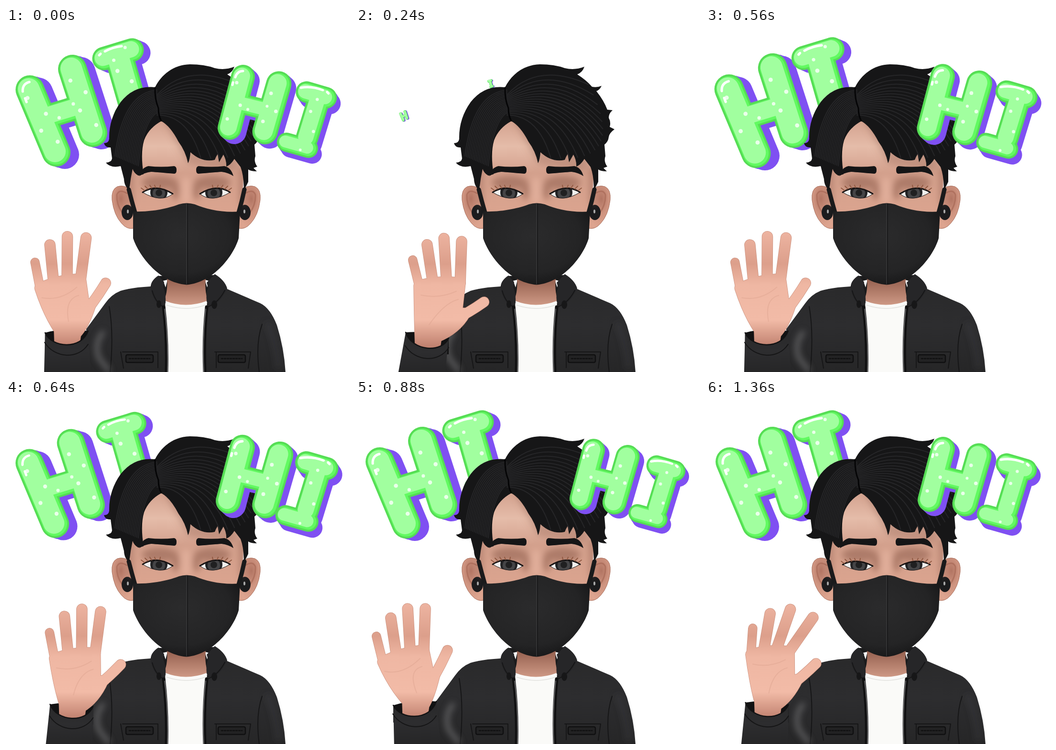
An HTML page for the animation above (1.44 s loop, 720 px wide and 720 px high).

```html
<!DOCTYPE html>
<html lang="en">
<head>
<meta charset="utf-8">
<title>Hi</title>
<style>
html, body { margin: 0; width: 100%; height: 100%; overflow: hidden; background: #fff; }
svg { display: block; width: 100vw; height: 100vh; }
path { stroke-linecap: round; stroke-linejoin: round; }
.line { fill: none; }
</style>
</head>
<body>
<svg viewBox="0 0 720 720">
  <defs>
    <filter id="soft" x="-60%" y="-60%" width="220%" height="220%"><feGaussianBlur stdDeviation="7"/></filter>
    <linearGradient id="skin" gradientUnits="userSpaceOnUse" x1="0" y1="200" x2="0" y2="390">
      <stop offset="0" stop-color="#d5a592"/><stop offset=".25" stop-color="#e5bca9"/>
      <stop offset=".55" stop-color="#d3a08c"/><stop offset="1" stop-color="#dba48f"/>
    </linearGradient>
    <linearGradient id="handSkin" gradientUnits="userSpaceOnUse" x1="0" y1="420" x2="0" y2="665">
      <stop offset="0" stop-color="#efb6a3"/><stop offset=".3" stop-color="#dc9f8b"/>
      <stop offset=".48" stop-color="#efb7a3"/><stop offset=".78" stop-color="#f2bba7"/>
      <stop offset="1" stop-color="#c18270"/>
    </linearGradient>
    <linearGradient id="neck" x2="0" y2="1">
      <stop offset="0" stop-color="#95604f"/><stop offset="1" stop-color="#d09b87"/>
    </linearGradient>
    <radialGradient id="mask" cx=".45" cy=".4" r=".65">
      <stop offset="0" stop-color="#2b2b2c"/><stop offset=".7" stop-color="#242425"/><stop offset="1" stop-color="#161617"/>
    </radialGradient>
    <radialGradient id="ear" cx=".4" cy=".3" r=".7">
      <stop offset="0" stop-color="#b27563"/><stop offset=".5" stop-color="#cf9480"/><stop offset="1" stop-color="#dda48f"/>
    </radialGradient>
    <linearGradient id="cloth" x2="0" y2="1">
      <stop offset="0" stop-color="#29292a"/><stop offset=".5" stop-color="#2d2d2f"/><stop offset="1" stop-color="#262627"/>
    </linearGradient>
    <clipPath id="eyeClip"><path id="eyeShape"/></clipPath>
  </defs>

  <g id="backLetters"></g>

  <!-- torso -->
  <path fill="url(#cloth)" d="M318 530L302 541Q264 543 240 550Q220 558 207 577L168 630V720H585Q582 670 567 622Q553 586 532 576L460 545L438 525Z"/>
  <path fill="#1b1b1c" d="M318 519L440 517L436 580H320Z"/>
  <path fill="#fff" d="M329 529L338 527L334 543ZM416 527L424 529L421 543Z"/>
  <path fill="url(#neck)" d="M337 525H418Q415 556 425 574Q380 590 329 573Q339 556 337 525Z"/>
  <path fill="#fafaf8" d="M333 571Q376 588 421 571L413 720H338Z"/>
  <path class="line" stroke="#e2e2df" stroke-width="1.5" d="M336 580Q378 594 417 580"/>
  <path fill="#262628" d="M319 518Q301 530 303 545Q306 566 319 578Q330 589 334 575Q335 558 329 541L331 532Z"/>
  <path fill="#262628" d="M437 515Q458 528 463 545Q452 568 438 578Q424 586 420 572Q418 556 423 543L420 533Z"/>
  <g class="line" stroke="#161617" stroke-width="2">
    <path d="M306 550Q313 575 331 585M458 549Q445 574 424 583M218 720Q226 640 216 583M530 720Q522 660 536 620"/>
    <path d="M244 678H318V711M240 678L246 712M437 678H512L507 712M440 678V711"/>
  </g>
  <g fill="#222223" stroke="#101011" stroke-width="2.5">
    <rect x="251" y="684" width="57" height="16" rx="3"/><rect x="444" y="684" width="57" height="16" rx="3"/>
    <path class="line" d="M258 692H301M451 692H494" stroke-dasharray="3 3"/>
  </g>
  <path class="line" stroke="#101011" stroke-width="7" d="M330 584Q338 650 336 720M420 584Q413 650 416 720"/>
  <path class="line" stroke="#777779" stroke-width="1.6" d="M332 588Q340 650 338 720M418 588Q411 650 414 720"/>
  <g fill="#171718"><ellipse cx="320" cy="578" rx="5" ry="8"/><ellipse cx="436" cy="579" rx="6" ry="9"/></g>
  <g filter="url(#soft)">
    <path class="line" stroke="#8a8a8c" stroke-width="9" opacity=".6" d="M202 638Q184 660 194 690L214 716"/>
    <path class="line" stroke="#444446" stroke-width="8" opacity=".5" d="M548 620Q566 660 570 710"/>
  </g>

  <!-- head -->
  <g id="earSide">
    <path fill="url(#ear)" stroke="#a96f5d" d="M262 340Q248 327 233 332Q220 338 222 360Q226 392 242 409Q254 423 268 419Z"/>
    <path class="line" stroke="#a86a58" stroke-width="3" opacity=".7" d="M253 346Q237 336 232 349Q231 369 243 386"/>
    <ellipse cx="254" cy="386" rx="12" ry="16" fill="#1b1b1d"/>
    <ellipse cx="255" cy="384" rx="2" ry="4" fill="#aaa"/>
  </g>
  <use href="#earSide" transform="matrix(-1 0 0 1 754 0)"/>
  <path fill="url(#skin)" d="M256 290Q258 345 270 390H488Q497 345 498 290L470 210L330 180L270 220Z"/>
  <g filter="url(#soft)">
    <g fill="#8d5c4b" opacity=".55">
      <ellipse cx="322" cy="324" rx="38" ry="15"/><ellipse cx="432" cy="324" rx="38" ry="15"/>
      <rect x="256" y="290" width="9" height="80"/><rect x="489" y="290" width="9" height="80"/>
      <ellipse cx="355" cy="340" rx="8" ry="20"/><ellipse cx="399" cy="340" rx="8" ry="20"/>
      <path d="M330 195L382 285L480 300L490 270L350 190Z" opacity=".6"/>
    </g>
    <path class="line" stroke="#eab9a5" stroke-width="12" d="M377 320V362" opacity=".7"/>
  </g>
  <g id="eyeSide">
    <g clip-path="url(#eyeClip)">
      <rect x="280" y="325" width="75" height="40" fill="#f0efed"/>
      <circle cx="320" cy="344" r="18" fill="#222224"/><circle cx="320" cy="346" r="13" fill="#454547"/>
      <circle cx="320" cy="345" r="7" fill="#202021"/>
    </g>
    <path id="eyeLine" class="line" stroke="#171313"/>
    <path id="lidLine" class="line" stroke="#171313"/>
    <path id="lashes" class="line" stroke="#925a43" stroke-width="2" d="M290 340L283 335M297 337L291 331M305 335L301 329M313 334L311 329M322 334L323 329"/>
    <path id="brow" fill="#151516" d="M279 310Q284 292 298 289Q325 292 352 289Q357 290 357 297Q357 305 352 305Q318 302 304 301Q289 303 279 310Z"/>
  </g>
  <use href="#eyeSide" transform="matrix(-1 0 0 1 755 0)"/>
  <path class="line" stroke="#1a1a1b" stroke-width="9" d="M257 338Q263 362 270 386M499 338Q494 362 487 386"/>
  <path fill="url(#mask)" d="M266 384C305 386 345 376 362 369Q378 364 395 369C420 380 455 387 490 384L487 440C477 476 434 533 378 537.500C320 533 278 476 266 440Z"/>
  <path class="line" stroke="#38383a" stroke-width="1.5" d="M378 368V536"/>
  <path class="line" stroke="#151516" stroke-width="1.5" d="M380 368V536"/>
  <path fill="#161617" d="M255 337Q247 328 247 316L240 289Q220 294 209 282Q221 281 222 273L219 250Q208 251 205 241Q215 241 216 232Q215 190 240 155Q268 119 312 124C325 98 350 77 385 76Q415 76 437 84Q458 89 478 81Q474 93 463 97Q482 109 494 123Q505 125 514 121Q510 130 503 132Q519 152 526 171L537 172Q529 179 529 188Q534 197 531 207L541 212Q530 220 529 228Q528 238 520 244L522 268Q518 280 526 290L518 293L525 300Q512 300 507 296L507 322L498 340Q498 310 491 291L478 274Q470 287 461 290Q462 278 455 265L446 281L443 264Q439 270 437 276Q410 282 386 260Q385 275 381 283Q376 258 361 238Q344 205 325 195Q299 209 289 235Q281 262 288 306L277 309Q268 304 265 295Q260 318 258 340Z"/>
  <g id="strands" class="line" stroke="#262628" stroke-width="2"></g>
  <path class="line" stroke="#050506" stroke-width="3" d="M312 125Q311 148 319 168Q319 184 325 194"/>

  <g id="arm"></g>
  <g id="frontLetters"></g>
</svg>
<script>
const $ = id => document.getElementById(id);
const mix = (a, b, t) => a + (b - a) * t;
const clamp = (v, lo, hi) => Math.min(hi, Math.max(lo, v));
const quad = (a, b, c, t) => mix(mix(a, b, t), mix(b, c, t), t);
let seed = 7;
const random = () => (seed = seed * 16807 % 2147483647) / 2147483647;

// Hair strands fan out from the parting
let hair = '';
for (let t = 0; t < 1; t += 1 / 16) {
  hair += `M316 ${130 + 50 * t}Q${245 + 45 * t} ${135 + 65 * t} ${228 + 52 * t} ${268 + 22 * t}`;
  hair += `M316 ${140 + 45 * t}Q${quad(380, 500, 365, t)} ${quad(70, 120, 190, t)} ${quad(486, 580, 384, t)} ${quad(118, 300, 268, t)}`;
}
$('strands').innerHTML = `<path d="${hair}"/>`;

// Each letter is a few bars: x1, y1, x2, y2, width. Drift: shift while the letter is small.
const letters = [
  { layer: 'backLetters', start: 3, cx: 115, cy: 174, drift: [-15, 10], shadow: [18, 5],
    bars: [[50, 129, 105, 260, 60], [139, 86, 182, 219, 60], [85, 186, 160, 163, 50]],
    shine: 'M35 133Q34 117 49 113M40 147L43 155' },
  { layer: 'backLetters', start: 3, cx: 243, cy: 110, drift: [38, 6], shadow: [14, 6],
    bars: [[205, 64, 264, 46, 49], [238, 65, 267, 166, 60], [250, 184, 296, 168, 48]],
    shine: 'M207 49Q223 40 242 38M195 57L198 54' },
  { layer: 'frontLetters', start: 5, cx: 522, cy: 163, drift: [0, 0], shadow: [10, 9],
    bars: [[496, 102, 468, 209, 50], [571, 117, 542, 217, 53], [490, 158, 555, 174, 42]],
    shine: 'M480 103Q484 90 496 90M475 114L474 119' },
  { layer: 'frontLetters', start: 5, cx: 632, cy: 198, drift: [0, 0], shadow: [8, 12],
    bars: [[629, 134, 670, 146, 45], [653, 155, 630, 230, 47], [587, 239, 633, 252, 40]],
    shine: 'M617 125Q640 121 663 130M672 134L675 137' }
];

// Dots run along a bar, alternating between its sides
function dotsOn([x1, y1, x2, y2, w]) {
  const length = Math.hypot(x2 - x1, y2 - y1), count = Math.round(length / 32);
  let dots = '';
  for (let i = 0; i < count; i++) {
    const t = (i + .4 + .3 * random()) / count, side = (i % 2 ? 1 : -1) * w * .19 / length;
    dots += `<circle cx="${mix(x1, x2, t) + (y2 - y1) * side}" cy="${mix(y1, y2, t) - (x2 - x1) * side}" r="${w / 14}" fill="#eaffea"/>`;
  }
  return dots;
}

function buildLetter(letter) {
  const { bars, shadow: [sx, sy], shine, layer } = letter;
  const coat = (dx, dy, color, thinner) => `<g stroke="${color}" transform="translate(${dx} ${dy})">` +
    bars.map(([x1, y1, x2, y2, w]) => `<path d="M${x1} ${y1}L${x2} ${y2}" stroke-width="${w - thinner}"/>`).join('') + '</g>';
  letter.node = document.createElementNS('http://www.w3.org/2000/svg', 'g');
  letter.node.innerHTML = coat(sx / 2, sy / 2, '#7f50f2', 0) + coat(sx, sy, '#7f50f2', 0) +
    coat(0, 0, '#56dc55', 0) + coat(0, 0, '#62fa61', 8) + coat(-2.5, -1.5, '#a1ff9f', 15) +
    bars.map(dotsOn).join('') + `<path class="line" stroke="#fff" stroke-width="5" d="${shine}"/>`;
  $(layer).append(letter.node);
}
letters.forEach(buildLetter);

// Grows to full size, then one sine ripple over and under it
function popScale(step) {
  const ripple = clamp((step - 1.6) / 5.8, 0, 1);
  return step < 0 ? 0 : Math.min(1, .1 + .45 * step) + .05 * Math.sin(2 * Math.PI * ripple);
}

function poseLetter({ node, start, cx, cy, drift }, frame) {
  const s = frame ? popScale(frame - start) : 1;
  const d = clamp((1 - s) * 6.5, 0, 1);
  node.setAttribute('transform', `translate(${cx + drift[0] * d} ${cy + drift[1] * d}) scale(${s}) translate(${-cx} ${-cy})`);
}

// Wave keys: frame, sway (0 outward, 1 toward the face), bend of the trailing fingers
const waveKeys = [
  [0, .2, .1], [1, 0, 0], [3, 1, 0], [5, 1, 1], [7, .2, .1], [9, 1, .1],
  [11, 0, 0], [14, 1, 0], [16, 1, 1], [17, .5, .6], [18, .2, .1]
];
function waveAt(frame) {
  const i = waveKeys.findIndex(key => key[0] > frame);
  const [from, to] = [waveKeys[i - 1], waveKeys[i]];
  const t = (frame - from[0]) / (to[0] - from[0]);
  return [mix(from[1], to[1], t), mix(from[2], to[2], t)];
}
function reach(x, y, degrees, length) {
  const angle = degrees * Math.PI / 180;
  return [x + Math.sin(angle) * length, y - Math.cos(angle) * length];
}

function drawArm(sway, bend) {
  const x = 123 + 26 * sway - 14 * bend, y = 635 + 8 * sway - 6 * bend, tilt = -4 + 10 * sway + 2 * bend;
  const px = 56 + 76 * sway, py = 548 - 9 * sway - 18 * bend;
  const ix = 142 + 76 * sway - 10 * bend, iy = 524 + 10 * sway - 4 * bend;
  const rootX = ix + 1 - 2 * tilt, rootY = iy + 76;
  const digits = [];
  for (let i = 0; i < 4; i++) {
    const t = i / 3, bx = mix(px, ix, t), by = mix(py, iy, t) - 27 * t * (1 - t);
    const [fx, fy] = reach(bx, by, -14 + 16 * t + bend * (30 + 25 * t ** 3), 55 + 90 * t - 58 * t * t);
    digits.push([`M${bx} ${by}L${fx} ${fy}`, i ? 22 : 18]);
  }
  const [tx, ty] = reach(rootX, rootY, 28 + 31 * sway + 10 * bend, 86 - 15 * sway);
  digits.push([`M${rootX} ${rootY}Q${mix(rootX, tx, .5) + 2} ${mix(rootY, ty, .5) + 2} ${tx} ${ty}`, 21]);
  const palm = `M${px} ${py}Q${mix(px, ix, .5)} ${mix(py, iy, .5) - 9} ${ix} ${iy}L${rootX + 4} ${rootY - 14}` +
    `L${mix(rootX, tx, .35)} ${mix(rootY, ty, .35)}Q${rootX + 3} ${rootY + 20} ${x + 19} ${y + 4}L${x + 16} ${y + 24}H${x - 14}` +
    `L${x - 15} ${y - 4}Q${mix(px, x - 15, .4)} ${mix(py, y, .55)} ${px} ${py}Z`;
  const hand = (color, extra) => `<g fill="none" stroke="${color}">` +
    digits.map(([d, w]) => `<path d="${d}" stroke-width="${w + extra}"/>`).join('') +
    `<path d="${palm}" fill="${color}" stroke-width="${22 + extra}"/></g>`;
  const left = x - 45, right = x + 45, foot = x - 50 - 1.7 * tilt;
  const rim = `M${left} ${y - tilt}C${left + 14} ${y + 34} ${right - 14} ${y + 38} ${right} ${y + tilt}`;
  $('arm').innerHTML =
    `<path fill="#121213" d="M${left} ${y - tilt}Q${x} ${y - 10} ${right} ${y + tilt}L${right} ${y + 40}H${left}Z"/>` +
    hand('#c98f7c', 1.5) + hand('url(#handSkin)', 0) +
    `<path class="line" stroke="#d59a86" stroke-width="2" opacity=".35" d="M${px + 4} ${py + 20}Q${mix(px, ix, .5)} ${py + 28} ${ix - 8} ${iy + 17}M${ix - 4} ${iy + 34}Q${ix - 34} ${iy + 42} ${x + 4} ${y - 22}"/>
    <path fill="url(#cloth)" d="${rim}L${foot + 98} 720H${foot}Z"/>
    <path class="line" stroke="#121213" stroke-width="2.5" d="${rim}"/>
    <path class="line" stroke="#151516" stroke-width="2" d="M${left - 1} ${y + 22}C${left + 20} ${y + 56} ${right - 20} ${y + 58} ${right} ${y + 26}"/>`;
}

function drawEyes(open) {
  const lid = `M286 ${mix(349, 344, open)}Q314 ${mix(360, 325, open)} 349 ${mix(351, 347, open)}`;
  $('eyeShape').setAttribute('d', lid + 'Q325 367 286 344Z');
  $('eyeLine').setAttribute('d', lid + `Q325 367 286 ${mix(349, 344, open)}`);
  $('lidLine').setAttribute('d', lid);
  $('lidLine').setAttribute('stroke-width', mix(1.5, 3, open));
  $('lashes').setAttribute('transform', `translate(0 ${mix(21, 0, open)})`);
  $('brow').setAttribute('transform', `translate(${mix(2.5, 0, open)} ${mix(8, 0, open)}) rotate(${mix(-1.3, 0, open)})`);
}

let shown = -1;
function tick(now) {
  const frame = Math.floor(now % 1440 / 80);
  if (frame !== shown) {
    shown = frame;
    letters.forEach(letter => poseLetter(letter, frame));
    drawArm(...waveAt(frame));
    // The lids drop fast and lift slowly
    const blink = frame - 14;
    drawEyes(Math.min(1, blink < 0 ? -blink / 1.5 : blink / 3.4));
  }
  requestAnimationFrame(tick);
}
tick(0);
</script>
</body>
</html>
```
